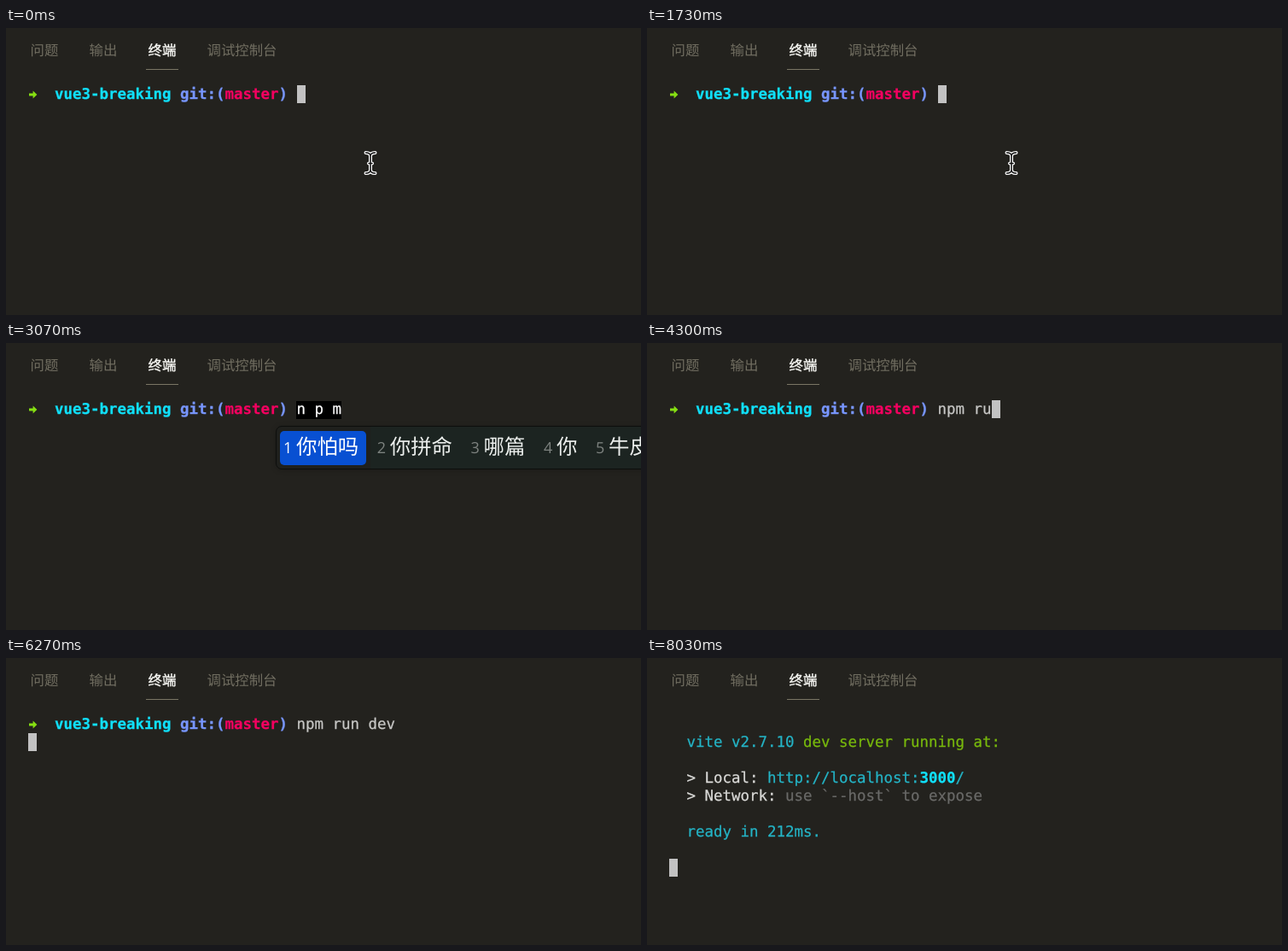
An HTML page that plays this animation: 744x336 px, repeating every 8.06 s.

```html
<!DOCTYPE html>
<html lang="zh-CN">
<head>
<meta charset="utf-8">
<title>Terminal</title>
<style>
  html, body { margin: 0; width: 100%; height: 100%; overflow: hidden; background: #23221e; }
  #stage {
    position: relative; width: 744px; height: 336px; overflow: hidden;
    background: #23221e; text-rendering: geometricPrecision;
  }
  #stage > *, #term > * { position: absolute; white-space: pre; }
  .tab, #popup { font-family: "Noto Sans CJK SC", "Noto Sans CJK", sans-serif; }
  .tab { top: 13px; font-size: 16.4px; line-height: 24px; color: #716e61; }
  .tab.on { color: #f8f8f4; -webkit-text-stroke: .4px; }
  #line { left: 163.5px; top: 48px; width: 38.5px; height: 1px; background: #7a7665; }
  #term {
    left: 25.5px; top: 67px; color: #c8c8c6;
    font: 17.44px/21px "DejaVu Sans Mono", monospace;
    -webkit-text-stroke: .25px;
  }
  #term b { font-weight: 700; }
  .aqua { color: #10e0fa; }
  .blue { color: #7896ff; }
  .red { color: #f40060; }
  .cyan { color: #24b4c6; }
  .lime { color: #78b90c; }
  .dim { color: #6a6a68; }
  .pale { color: #dadad8; }
  .ime { display: inline-block; height: 21px; background: #000; color: #fff; }
  #cursor { width: 10.5px; height: 21px; background: #c2c2c2; }
  #popup {
    left: 316px; top: 97px; width: 600px; height: 49px;
    border: 1px solid #0d0e0c; border-radius: 7px;
    background: linear-gradient(90deg, #1f201d 110px, #1c2421 110px);
    box-shadow: 0 1px 6px rgba(0, 0, 0, .22);
  }
  #popup > * { position: absolute; line-height: 40px; top: 5px; }
  #popup .pick { left: 4px; height: 40px; border-radius: 5px; background: #0850d2; }
  #popup .num { font: 18px/40px "Open Sans", "Noto Sans", sans-serif; color: #7d827f; }
  #popup .word { font-size: 24.4px; top: 3px; color: #ecefed; }
  #popup .first { color: #fff; }
</style>
</head>
<body>
<div id="stage">
  <div class="tab" style="left:28.5px">问题</div>
  <div class="tab" style="left:97.5px">输出</div>
  <div class="tab on" style="left:166.5px">终端</div>
  <div class="tab" style="left:235.5px">调试控制台</div>
  <div id="line"></div>
  <div id="term"></div>
  <div id="popup"></div>
  <svg id="beam" width="744" height="336" style="left:0;top:0" fill="none" stroke-linecap="round">
    <g id="ibeam"></g>
  </svg>
</div>
<script>
const LOOP = 8060, CHAR = 10.5, ROW = 21, PROMPT_COLS = 30, TEXT_DROP = 1;
const el = id => document.getElementById(id);
const span = (cls, text) => `<span class="${cls}">${text}</span>`;
const bold = (cls, text) => `<b class="${cls}">${text}</b>`;
const line = (row, html) => `<div style="left:0;top:${row * ROW + TEXT_DROP}px">${html}</div>`;
const cursor = (row, col) =>
  `<div id="cursor" style="left:${col * CHAR}px;top:${row * ROW}px"></div>`;

const arrow = '<svg width="11" height="21" style="left:0;top:0">' +
  '<path d="M1 9.6H5.6V6.6L10.4 11L5.6 15.4V12.4H1Z" fill="#86df12"/></svg>';
const prompt = '   ' + bold('aqua', 'vue3-breaking') + ' ' + bold('blue', 'git:(') +
  bold('red', 'master') + bold('blue', ')') + ' ';

const words = {
  'n': ['你', '那', '呢', '能', '年', '女', '难'],
  'n p': ['你怕', '你陪', '哪怕', '牛皮', '奶瓶'],
  'n p m': ['你怕吗', '你拼命', '哪篇', '你', '牛皮']
};

const typed = text => ({ html: arrow + line(0, prompt + text) + cursor(0, PROMPT_COLS + text.length) });
const compose = text => ({ html: arrow + line(0, prompt + span('ime', text)), words: words[text] });

const command = arrow + line(0, prompt + 'npm run dev');
const script = command + line(2, '&gt; vue3-breaking@0.0.0 dev') + line(3, '&gt; vite');
const server =
  line(1, '  ' + span('cyan', 'vite v2.7.10') + ' ' + span('lime', 'dev server running at:')) +
  line(3, '  ' + span('pale', '&gt; Local: ') + span('cyan', 'http://localhost:') +
    bold('aqua', '3000') + span('cyan', '/')) +
  line(4, '  ' + span('pale', '&gt; Network: ') + span('dim', 'use `--host` to expose')) +
  line(6, '  ' + span('cyan', 'ready in 212ms.'));

// Each entry: start time in ms, screen state
const steps = [
  [0, { ...typed(''), beam: true }],
  [2330, compose('n')],
  [2470, compose('n p')],
  [2640, compose('n p m')],
  [3270, typed('npm')],
  [3570, typed('npm ')],
  [3840, typed('npm r')],
  [4070, typed('npm ru')],
  [4400, typed('npm run')],
  [4700, typed('npm run ')],
  [5000, typed('npm run d')],
  [5200, typed('npm run de')],
  [5470, typed('npm run dev')],
  [6070, { html: command + cursor(1, 0) }],
  [6370, { html: script + cursor(5, 0) }],
  [6800, { html: server + cursor(8, 0) }]
];

function candidates(list) {
  let x = 0;
  return list.map((word, i) => {
    const width = 36.6 + 24.4 * word.length;
    const first = i ? '' : ' first';
    const pick = i ? '' : `<div class="pick" style="width:${width - 8.8}px"></div>`;
    const html = pick +
      `<div class="num${first}" style="left:${x + 8}px">${i + 1}</div>` +
      `<div class="word${first}" style="left:${x + 23}px">${word}</div>`;
    x += width;
    return html;
  }).join('');
}

const shape = 'M421.5 146Q427 146 427 150V166Q427 170 421.5 170' +
  'M432.5 146Q427 146 427 150M427 166Q427 170 432.5 170M425 158.5H429';
el('ibeam').innerHTML = [['#fff', 4], ['#111', 1.5]]
  .map(([color, width]) => `<path d="${shape}" stroke="${color}" stroke-width="${width}"/>`).join('');

let shown = null;
function draw(now) {
  const t = Math.max(0, now - start) % LOOP;
  const state = steps.filter(step => step[0] <= t).pop()[1];
  if (state !== shown) {
    shown = state;
    el('term').innerHTML = state.html;
    el('popup').style.display = state.words ? 'block' : 'none';
    el('popup').innerHTML = state.words ? candidates(state.words) : '';
    el('beam').style.display = state.beam ? 'block' : 'none';
  }
}
function tick(now) {
  draw(now);
  requestAnimationFrame(tick);
}
const start = performance.now();
draw(start);
requestAnimationFrame(tick);
</script>
</body>
</html>
```
